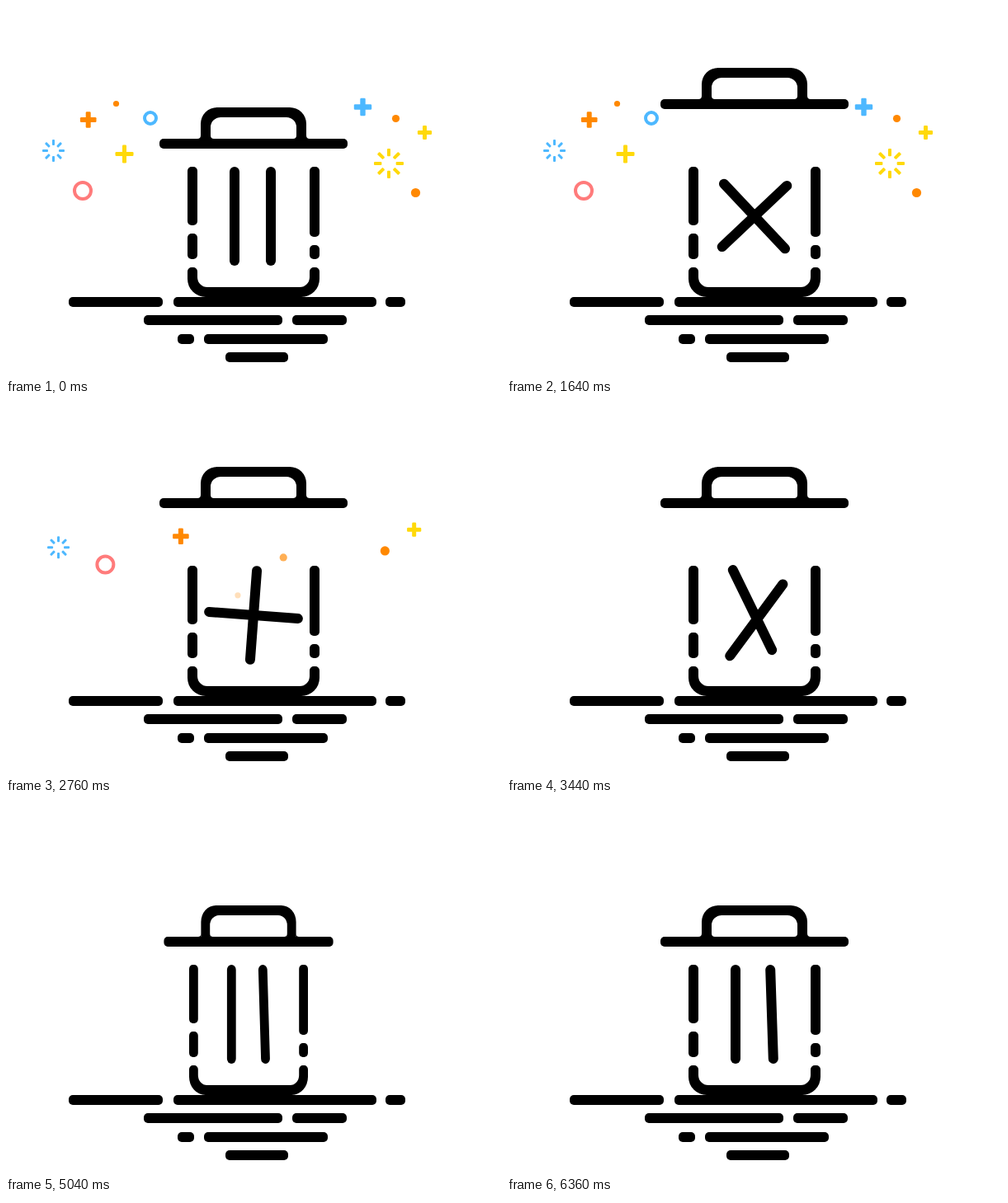
Animation, 600 px wide and 450 px high, one loop 7200 ms. Source, as an HTML page:

```html
<!DOCTYPE html>
<html lang="en">
<head>
<meta charset="utf-8">
<title>Bin</title>
<style>
html, body { margin: 0; width: 100%; height: 100%; overflow: hidden; background: #fff; }
svg { display: block; width: 600px; height: 450px; }
.bar { stroke: #000; stroke-width: 12; stroke-linecap: round; }
</style>
</head>
<body>
<svg viewBox="0 0 600 450">
  <g id="ground"></g>
  <g id="particles"></g>
  <g id="bin">
    <g id="sides"></g>
    <path d="M220 322v9a22 22 0 0 0 22 22h116a22 22 0 0 0 22-22v-9a5 5 0 0 0-5-5h-2a5 5 0 0 0-5 5v7a12 12 0 0 1-12 12h-112a12 12 0 0 1-12-12v-7a5 5 0 0 0-5-5h-2a5 5 0 0 0-5 5z"/>
    <g id="bars">
      <path id="left" class="bar" d="M0-54V54"/>
      <path id="right" class="bar" d="M0-54V54"/>
    </g>
    <g id="lid">
      <rect x="186" y="161" width="228" height="12" rx="5"/>
      <path d="M236 163v-20a20 20 0 0 1 20-20h88a20 20 0 0 1 20 20v20h-12v-16a12 12 0 0 0-12-12h-80a12 12 0 0 0-12 12v16z"/>
      <path d="M232 161q4 0 4-4v4zM252 161q-4 0-4-4v4zM348 161q4 0 4-4v4zM368 161q-4 0-4-4v4z"/>
    </g>
  </g>
</svg>
<script>
const LOOP = 7200, STEP = 40, FLIGHT = 720;
const MOUTH = { x: 300, y: 255 };
const ORANGE = '#ff8800', BLUE = '#4db8ff', YELLOW = '#ffd90a', PINK = '#ff7b7b';
const el = id => document.getElementById(id);

function add(parent, tag, attrs) {
  const node = document.createElementNS('http://www.w3.org/2000/svg', tag);
  for (const key in attrs) node.setAttribute(key, attrs[key]);
  return parent.appendChild(node);
}

const rows = [
  [353, [76, 190], [203, 449], [460, 484]],
  [375, [167, 335], [347, 413]],
  [398, [208, 228], [240, 390]],
  [420, [266, 342]]
];
for (const [y, ...spans] of rows)
  for (const [x, end] of spans)
    add(el('ground'), 'rect', { x, y, width: end - x, height: 12, rx: 5 });

for (const [x, y, end] of [[220, 195, 266], [220, 276, 307], [368, 195, 280], [368, 290, 307]])
  add(el('sides'), 'rect', { x, y, width: 12, height: end - y, rx: 5 });

// Shape makers draw around the origin: radius, line width, colour.
const shapes = {
  dot: (g, r, w, fill) => add(g, 'circle', { r, fill }),
  ring: (g, r, w, stroke) => add(g, 'circle', { r, fill: 'none', stroke, 'stroke-width': w }),
  plus(g, r, w, fill) {
    add(g, 'rect', { x: -r, y: -w / 2, width: 2 * r, height: w, rx: 1.3, fill });
    add(g, 'rect', { x: -w / 2, y: -r, width: w, height: 2 * r, rx: 1.3, fill });
  },
  burst(g, r, w, fill) {
    const inner = r * 0.48;
    for (let a = 0; a < 360; a += 45)
      add(g, 'rect', { x: inner, y: -w / 2, width: r - inner, height: w, rx: 1, fill, transform: `rotate(${a})` });
  }
};

// kind, radius, width, colour, x, y, control x, control y, start time
const particles = [
  ['ring', 7, 4, BLUE, 175, 136, 235, 115, 1640],
  ['plus', 10.7, 6.4, BLUE, 432.5, 122.5, 350, 115, 1750],
  ['plus', 11, 5, YELLOW, 143.5, 179.5, 210, 105, 1860],
  ['burst', 18, 4, YELLOW, 464, 191, 380, 90, 1970],
  ['dot', 3.6, 0, ORANGE, 133.5, 118.5, 222, 151, 2085],
  ['dot', 4.6, 0, ORANGE, 472.5, 136.5, 349, 114, 2158],
  ['plus', 9.8, 6, ORANGE, 99.7, 138, 224, 122, 2251],
  ['dot', 5.6, 0, ORANGE, 496.5, 226.5, 405, 68, 2438],
  ['ring', 10, 4, PINK, 93, 224, 182, 102, 2481],
  ['plus', 8.6, 5, YELLOW, 507.5, 153.5, 400, 130, 2584],
  ['burst', 13.5, 3, BLUE, 57.5, 175.5, 180, 115, 2647]
].map(([kind, r, w, color, x, y, cx, cy, start]) => {
  const node = add(el('particles'), 'g', {});
  shapes[kind](node, r, w, color);
  return { node, x, y, cx, cy, start };
});

const clamp = v => Math.min(1, Math.max(0, v));
const quad = (a, b, c, p) => (1 - p) ** 2 * a + 2 * p * (1 - p) * b + p * p * c;

// Straight-line interpolation between [time, value] steps.
function track(t, ...steps) {
  if (t <= steps[0][0]) return steps[0][1];
  for (let i = 1; i < steps.length; i++) {
    const [t0, v0] = steps[i - 1], [t1, v1] = steps[i];
    if (t <= t1) return v0 + (v1 - v0) * (t - t0) / (t1 - t0);
  }
  return steps[steps.length - 1][1];
}

// The bars cross, turn together, then part again.
function drawBars(t) {
  const gap = track(t, [400, 22], [1200, 0], [3200, 0], [4000, 22]);
  const spin = track(t, [1600, 0], [3200, 68], [3440, 68.5], [4000, 0]);
  const left = track(t, [400, 0], [1200, 45], [3200, 45], [4000, 180]);
  const right = track(t, [400, 0], [1200, -45], [3200, -45], [4000, -1.9]);
  el('bars').setAttribute('transform', `translate(300 255) rotate(${spin})`);
  el('left').setAttribute('transform', `translate(${-gap - gap / 22} 0) rotate(${left})`);
  el('right').setAttribute('transform', `translate(${gap - gap / 22} 0) rotate(${right})`);
}

function binTransform(t) {
  const squeeze = track(t, [4800, 1], [5280, 0.8], [5680, 1]);
  const angle = track(t, [5800, 0], [5940, -16.4], [6220, 16.4], [6360, 0]);
  const pivot = 300 + 30 * Math.sign(angle);
  return `rotate(${angle} ${pivot} 353) translate(240 0) scale(${squeeze} 1) translate(-240 0)`;
}

function draw(t) {
  const lift = track(t, [400, 0], [1200, -48], [3880, -48], [4400, 0]);
  el('lid').setAttribute('transform', `translate(0 ${lift})`);
  el('bin').setAttribute('transform', binTransform(t));
  drawBars(t);
  for (const { node, x, y, cx, cy, start } of particles) {
    const p = clamp((t - start) / FLIGHT) ** 2;
    node.setAttribute('transform', `translate(${quad(x, cx, MOUTH.x, p)} ${quad(y, cy, MOUTH.y, p)})`);
    node.setAttribute('opacity', clamp((1 - p) / 0.45));
  }
}

const begin = performance.now();
function tick() {
  const t = (performance.now() - begin) % LOOP;
  draw(Math.floor(t / STEP) * STEP);
  requestAnimationFrame(tick);
}
tick();
</script>
</body>
</html>
```
